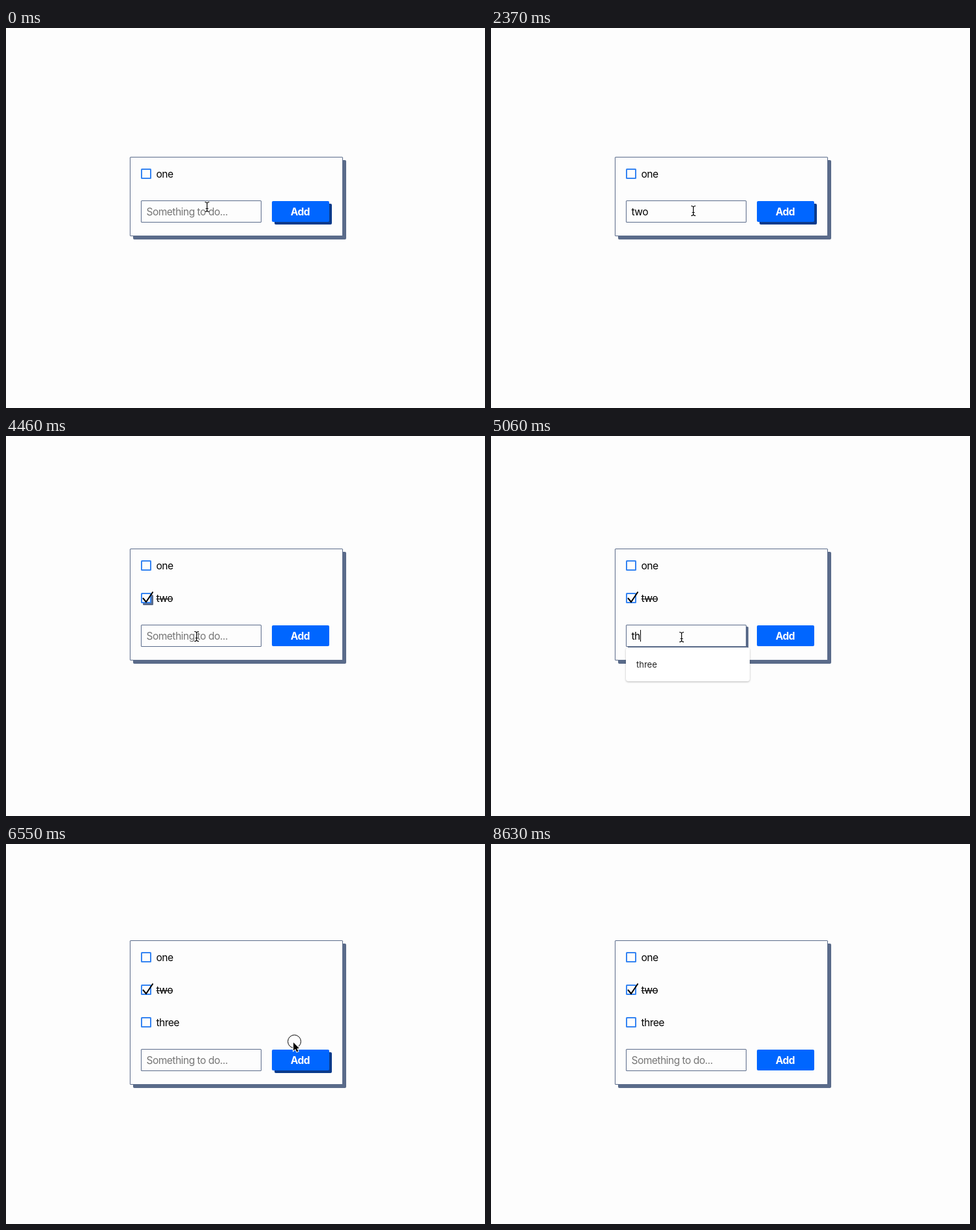
Animation, 735 px wide and 584 px high, one loop 8.73 s. Source, as an HTML page with a canvas:

```html
<!DOCTYPE html>
<html lang="en">
<head>
<meta charset="utf-8">
<title>To-do list</title>
<style>
  html, body { margin: 0; width: 100%; height: 100%; overflow: hidden; background: #fdfdfd; }
  canvas { display: block; }
</style>
</head>
<body>
<canvas id="stage" width="735" height="584"></canvas>
<script>
const ctx = document.getElementById('stage').getContext('2d');
const LOOP = 8730;
const INK = '#5a6b8a', PAPER = '#fdfdfd', BLUE = '#0066ff', NAVY = '#0b3b8c', BOX = '#3584f2';
const HISTORY = ['two', 'three', 'test', 'task', 'todo', 'ten'];

// Each step changes only the listed properties and holds until the next.
const start = { items: ['one'], done: false, text: '', focus: 'button', menu: [],
  x: 308, y: 275, pointer: 'beam', click: false };
const steps = [
  [0, {}],
  [1040, { x: 309, y: 285 }],
  [1190, { x: 309, y: 302, pointer: 'arrow' }],
  [1340, { click: true, focus: '' }],
  [1480, { click: false }],
  [1630, { x: 310, y: 290, pointer: 'beam' }],
  [1780, { y: 281, click: true, focus: 'input' }],
  [1930, { click: false }],
  [2070, { text: 't', menu: HISTORY }],
  [2220, { text: 'tw', menu: ['two'] }],
  [2370, { text: 'two', menu: [], focus: 'button' }],
  [2670, { text: '', items: ['one', 'two'], pointer: 'arrow' }],
  [3420, { click: true, focus: '' }],
  [3570, { click: false }],
  [4010, { x: 246, y: 259 }],
  [4160, { x: 214, y: 250, click: true, done: true, focus: 'check' }],
  [4310, { x: 250, y: 282, click: false }],
  [4460, { x: 292, y: 308, pointer: 'beam' }],
  [4610, { y: 309, click: true, focus: 'input' }],
  [4760, { click: false, text: 't', menu: HISTORY }],
  [5060, { text: 'th', menu: ['three'] }],
  [5210, { text: 'thre' }],
  [5500, { text: 'three', menu: [] }],
  [5950, { x: 334, y: 309 }],
  [6100, { x: 412, y: 306, pointer: 'arrow' }],
  [6250, { x: 441, y: 304 }],
  [6400, { click: true, focus: 'button' }],
  [6550, { text: '', items: ['one', 'two', 'three'] }],
  [6700, { click: false }],
  [7300, { x: 269, y: 190 }],
  [7450, { x: 420, y: 37 }],
  [7600, { x: 646, y: 210 }],
  [7750, { x: 604, y: 464 }],
  [7900, { x: 580, y: 440 }],
  [8200, { click: true, focus: '' }],
  [8350, { click: false }],
  [8480, { x: 686, y: 540 }],
  [8630, { pointer: '' }]
];

function stateAt(time) {
  const state = { ...start };
  for (const [at, change] of steps) {
    if (at > time) break;
    Object.assign(state, change);
  }
  return state;
}

function fillBox(x, y, w, h, color, radius = 1.5) {
  ctx.fillStyle = color;
  ctx.beginPath();
  ctx.roundRect(x, y, w, h, radius);
  ctx.fill();
}

function frameBox(x, y, w, h, color, line = 1) {
  fillBox(x, y, w, h, color);
  fillBox(x + line, y + line, w - 2 * line, h - 2 * line, PAPER, 0.5);
}

function write(text, x, y, color = '#000', weight = 400, align = 'left') {
  ctx.font = `${weight} 15.5px Inter, sans-serif`;
  ctx.letterSpacing = '-0.5px';
  ctx.textAlign = align;
  ctx.fillStyle = color;
  ctx.fillText(text, x, y);
  return ctx.measureText(text).width;
}

function trace(points) {
  ctx.beginPath();
  points.forEach(([x, y]) => ctx.lineTo(x, y));
}

function drawItem(label, y, checked, focused) {
  if (focused) fillBox(210, y + 3, 16, 16, INK);
  frameBox(207, y, 16, 16, BOX, 2);
  const width = write(label, 230.5, y + 14);
  if (!checked) return;
  ctx.fillRect(230.5, y + 9, width, 1);
  trace([[210, y + 8], [215, y + 14], [225.5, y - 1.5]]);
  ctx.strokeStyle = '#000';
  ctx.lineWidth = 2;
  ctx.stroke();
}

function drawInput(state, y) {
  const focused = state.focus === 'input';
  if (focused) fillBox(210, y + 3, 185, 34, INK);
  frameBox(207, y, 185, 34, INK);
  let caret = 216;
  if (state.text) caret += write(state.text, 215.5, y + 23);
  else write('Something to do...', 215.5, y + 23, '#757575');
  if (focused) {
    ctx.fillStyle = '#000';
    ctx.fillRect(Math.round(caret), y + 8, 1, 18);
  }
}

function drawButton(y, focused) {
  if (focused) fillBox(412, y + 4, 88, 32, NAVY, 2);
  fillBox(408, y, 88, 32, BLUE, 2);
  write('Add', 451.5, y + 22, '#fff', 700, 'center');
}

function drawMenu(rows, y) {
  if (!rows.length) return;
  ctx.save();
  ctx.shadowColor = 'rgba(0,0,0,.28)';
  ctx.shadowBlur = 3;
  ctx.shadowOffsetY = 1;
  fillBox(207, y + 1, 190, rows.length * 36 + 16, '#fff', 4);
  ctx.restore();
  ctx.font = '13px Inter, sans-serif';
  ctx.letterSpacing = '0px';
  ctx.textAlign = 'left';
  ctx.fillStyle = '#222';
  rows.forEach((row, i) => ctx.fillText(row, 223, y + 32 + i * 36));
}

function drawPointer({ x, y, pointer, click }) {
  if (!pointer) return;
  ctx.save();
  ctx.translate(x, y);
  if (click) {
    ctx.beginPath();
    ctx.arc(1.5, -0.5, 10, 0, Math.PI * 2);
    ctx.strokeStyle = '#000';
    ctx.lineWidth = 1;
    ctx.stroke();
  }
  if (pointer === 'arrow') {
    trace([[0, 1], [0, 13.5], [3, 11], [5.2, 15.5], [7.4, 14.5], [5.4, 10.2], [9, 10]]);
    ctx.closePath();
    ctx.strokeStyle = '#fff';
    ctx.lineWidth = 2;
    ctx.stroke();
    ctx.fillStyle = '#000';
    ctx.fill();
  } else {
    ctx.beginPath();
    ctx.moveTo(-3, -7.5);
    ctx.quadraticCurveTo(0.5, -7.5, 0.5, -5);
    ctx.lineTo(0.5, 5);
    ctx.quadraticCurveTo(0.5, 7.5, -3, 7.5);
    ctx.moveTo(4, -7.5);
    ctx.quadraticCurveTo(0.5, -7.5, 0.5, -5);
    ctx.moveTo(0.5, 5);
    ctx.quadraticCurveTo(0.5, 7.5, 4, 7.5);
    ctx.moveTo(-1.5, 2.5);
    ctx.lineTo(2.5, 2.5);
    for (const [color, line] of [['#fff', 2.4], ['#000', 1.2]]) {
      ctx.strokeStyle = color;
      ctx.lineWidth = line;
      ctx.stroke();
    }
  }
  ctx.restore();
}

function draw(time) {
  const state = stateAt(time);
  const extra = (state.items.length - 1) * 50;
  const top = 198 - extra / 2;
  const inputY = top + 67 + extra;
  ctx.fillStyle = PAPER;
  ctx.fillRect(0, 0, 735, 584);
  fillBox(195, top + 5, 327, 122 + extra, INK, 2);
  frameBox(190, top, 327, 122 + extra, INK);
  state.items.forEach((label, i) => {
    const checked = i === 1 && state.done;
    drawItem(label, top + 18 + i * 50, checked, checked && state.focus === 'check');
  });
  drawInput(state, inputY);
  drawButton(inputY + 1, state.focus === 'button');
  drawMenu(state.menu, inputY + 34);
  drawPointer(state);
}

const began = performance.now();
function tick() {
  draw((performance.now() - began) % LOOP);
  requestAnimationFrame(tick);
}
tick();
</script>
</body>
</html>
```
